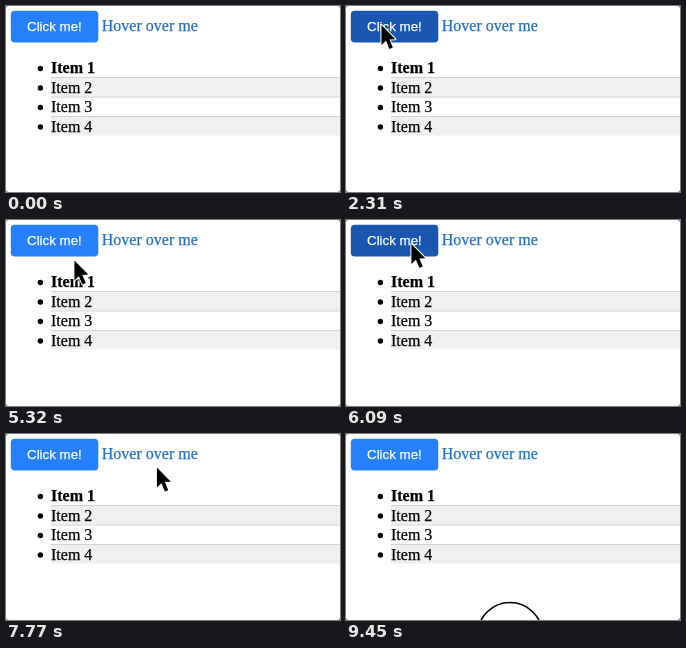
Animation of 334 by 186 pixels, one loop 9520 ms. Source, as an HTML page:

```html
<!DOCTYPE html>
<html lang="en">
<head>
<meta charset="utf-8">
<title>Hover demo</title>
<style>
html, body { margin: 0; width: 100%; height: 100%; overflow: hidden; background: #fff; }
svg { display: block; width: 100vw; height: 100vh; }
text { stroke-width: .25; }
.serif { font: 16px "Liberation Serif", "Times New Roman", serif; }
.sans { font: 13.333px "Liberation Sans", Arial, sans-serif; }
</style>
</head>
<body>
<svg viewBox="0 0 334 186">
  <rect width="334" height="186" fill="#777"/>
  <rect width="334" height="186" rx="3" fill="#fff"/>
  <rect id="button" x="4.8" y="4.8" width="87.5" height="31.8" rx="4"/>
  <text class="sans" x="21" y="25" fill="#fff" stroke="#fff">Click me!</text>
  <text class="serif" x="95.8" y="25" fill="#2270c6" stroke="#2270c6">Hover over me</text>
  <rect id="underline" x="95.8" y="26.5" width="96" height="1" fill="#2270c6"/>
  <g id="list" class="serif"></g>
  <path id="cursor" d="M0 0V20L4.5 15.8L8 24L11.4 22.6L8 14.5L13.9 14.2Z"
    fill="#000" stroke="#fff" stroke-width="2" stroke-linejoin="round" paint-order="stroke"/>
  <circle id="ring" r="32.4" fill="none" stroke="#000" stroke-width="1.6"/>
</svg>
<script>
const STEP = 70, LOOP = 9520;
const BLUE = "#2680fb", HOVER = "#1b57b0", ACTIVE = "#173f81";
const el = id => document.getElementById(id);
const button = el("button"), underline = el("underline");
const cursor = el("cursor"), ring = el("ring");

// The pointer rests between moves; bend bows a path downwards
const entry = { x: 57, y: 85 };
const moves = [
  { start: 1400, steps: 4, x: 35, y: 18 },
  { start: 2310, steps: 4, x: 39, y: 24, ease: "in" },
  { start: 4900, steps: 4, x: 69, y: 55 },
  { start: 5250, steps: 4, x: 67, y: 24, ease: "linear" },
  { start: 5670, steps: 4, x: 69, y: 48 },
  { start: 6020, steps: 3, x: 64.5, y: 20 },
  { start: 6440, steps: 10, x: 150, y: 22, ease: "linear", bend: 40 },
  { start: 7350, steps: 4, x: 150.5, y: 46 },
  { start: 7700, steps: 6, x: 150.5, y: 22 },
  { start: 8750, steps: 5, x: 165, y: 202, ease: "linear" }
];
const easing = {
  linear: u => u,
  in: u => u * u * u,
  out: u => 1 - (1 - u) ** 2
};
// Each press lights the ring one step before the button reacts
const presses = [
  { start: 1820, steps: 1 },
  { start: 3080, steps: 3 },
  { start: 3850, steps: 3 },
  { start: 9450, steps: 1 }
];

function tipAt(t) {
  let tip = null;
  for (const { start, steps, x, y, ease = "out", bend = 0 } of moves) {
    if (t < start) break;
    const from = tip || entry;
    const u = Math.min(1, ((t - start) / STEP + 1) / steps);
    const e = easing[ease](u);
    tip = {
      x: from.x + (x - from.x) * e,
      y: from.y + (y - from.y) * e + bend * Math.sin(Math.PI * u)
    };
  }
  return tip;
}

function inside(tip, left, top, right, bottom) {
  return tip && tip.x >= left && tip.x <= right && tip.y >= top && tip.y <= bottom;
}

function show(node, on) {
  node.setAttribute("visibility", on ? "visible" : "hidden");
}

function buildList() {
  let out = "";
  for (let i = 0; i < 4; i++) {
    const top = 52 + i * 19.5;
    if (i % 2) out += `<rect x="45" y="${top}" width="289" height="19" fill="#f0f0f0"/>`;
    if (i) out += `<rect x="45" y="${top - 0.5}" width="289" height="1" fill="#d2d2d2"/>`;
    out += `<circle cx="34.4" cy="${top + 10.5}" r="2.7"/>` +
      `<text x="45" y="${top + 15}" stroke="#000" font-weight="${i ? 400 : 700}">Item ${i + 1}</text>`;
  }
  el("list").innerHTML = out;
}

function draw(now) {
  const t = Math.floor((now % LOOP) / STEP) * STEP;
  const tip = tipAt(t);
  const press = presses.find(p => t >= p.start && t < p.start + p.steps * STEP);
  const hover = t >= moves[1].start && inside(tip, 5, 5, 92, 36);
  const active = hover && press && t > press.start;
  button.setAttribute("fill", active ? ACTIVE : hover ? HOVER : BLUE);
  show(underline, inside(tip, 96, 11, 192, 29));
  show(cursor, tip);
  show(ring, press);
  if (tip) {
    cursor.setAttribute("transform", `translate(${tip.x + 0.4} ${tip.y + 0.9})`);
    ring.setAttribute("cx", tip.x - 1);
    ring.setAttribute("cy", tip.y - 1.1);
  }
}

buildList();
const begin = performance.now();
function tick() {
  draw(performance.now() - begin);
  requestAnimationFrame(tick);
}
tick();
</script>
</body>
</html>
```
